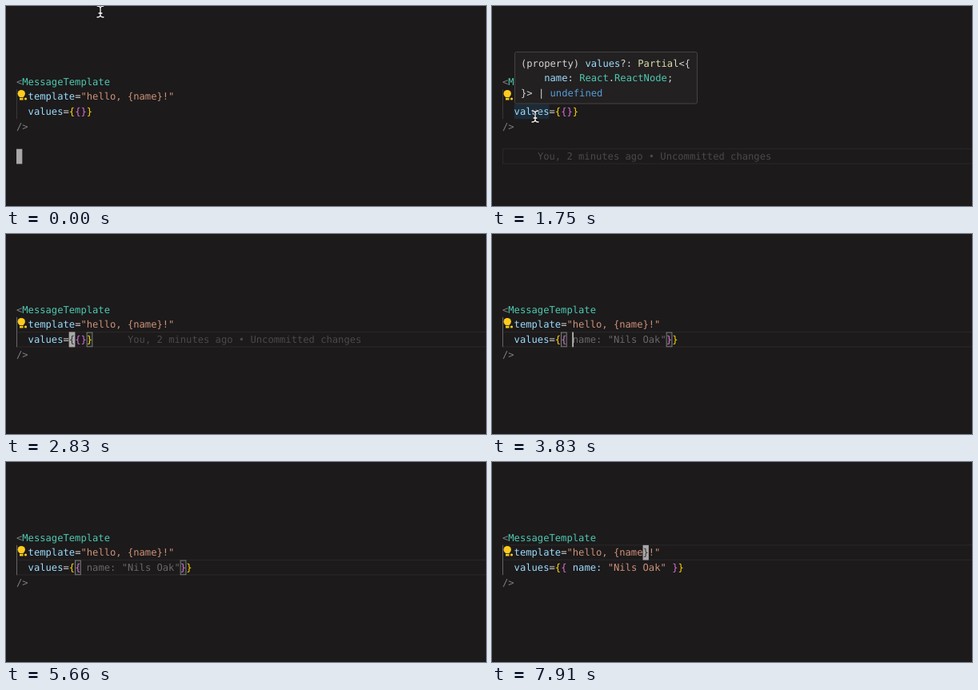
Animation, 600 px wide and 250 px high, one loop 8000 ms. Source, as an HTML page:

```html
<!DOCTYPE html>
<html lang="en">
<head>
<meta charset="utf-8">
<title>Editor demo</title>
<style>
  html, body { margin: 0; width: 100%; height: 100%; overflow: hidden; background: #1c1a1b; }
  svg { display: block; width: 600px; height: 250px; }
  text {
    font: 12.15px "DejaVu Sans Mono", monospace;
    white-space: pre;
    text-rendering: geometricPrecision;
  }
</style>
</head>
<body>
<svg viewBox="0 0 600 250">
  <rect width="600" height="250" fill="#1c1a1b"/>
  <g id="editor"></g>
  <g id="mouse" fill="none" stroke-linecap="round">
    <path d="M-4-7Q0-7 0-4Q0-7 4-7M0-4V4M-4 7Q0 7 0 4Q0 7 4 7M-2 2H2" stroke="#111" stroke-width="3"/>
    <path d="M-4-7Q0-7 0-4Q0-7 4-7M0-4V4M-4 7Q0 7 0 4Q0 7 4 7M-2 2H2" stroke="#fff" stroke-width="1.3"/>
  </g>
</svg>
<script>
const LOOP = 8000, CW = 7.315, LH = 18.7, LEFT = 13, TOP = 85.2;
const C = {
  bg: '#1c1a1b', tag: '#4ec9b0', attr: '#9cdcfe', str: '#ce9178', gold: '#ffd700',
  pink: '#da70d6', punct: '#808080', plain: '#d4d4d4', ghost: '#696768', blame: '#4b494a',
  fn: '#dcdcaa', key: '#569cd6', panel: '#222021', edge: '#454344', cursor: '#a9a7a8'
};
const NAME = '"Nils Oak"';
const BLAME = 'You, 2 minutes ago • Uncommitted changes';
const editor = document.getElementById('editor');
const mouse = document.getElementById('mouse');

// Each step changes part of the state; a new cursor place restarts the blink.
const steps = [
  [0, { row: 5, col: 0, mode: 'block', inner: 0, bright: false, line: false, blame: false, hover: false, menu: false, pair: null }],
  [1100, { blame: true, line: true }],
  [1750, { hover: true }],
  [2160, { hover: false, row: 4, blame: false, bright: false }],
  [2250, { row: 3 - 1, bright: true }],
  [2420, { blame: true }],
  [2480, { col: 2 }],
  [2600, { col: 8 }],
  [2700, { col: 9, pair: [9, 12] }],
  [2950, { col: 10, pair: [10, 11] }],
  [3130, { col: 11, mode: 'bar' }],
  [3690, { col: 12, inner: 1, pair: [10, 12] }],
  [3790, { inner: 2, blame: false, pair: [10, 28] }],
  [4600, { menu: true }],
  [5450, { menu: false }],
  [5680, { inner: 3, col: 28 }],
  [6080, { inner: 4, col: 29, pair: [10, 29] }],
  [6350, { mode: 'block', col: 28 }],
  [7000, { col: 27 }],
  [7080, { col: 26 }],
  [7160, { col: 25 }],
  [7240, { col: 24 }],
  [7660, { row: 1, pair: null }]
];

const mousePath = [
  [0, 118, 7], [250, 150, 26], [480, 200, 48], [830, 120, 73], [1250, 58, 135], [1500, 54, 138], [2160, 54, 138]
];

const menuItems = [
  ['name?', ''],
  ['epwc', 'Export Pdf Workflow Components'],
  ['fileheader', 'File Header Comments'],
  ['log', 'Print to console'],
  ['sf', 'Forwarded Ref Component'],
  ['trfc', 'Type React Functional Component']
];

const esc = s => s.replace(/&/g, '&amp;').replace(/</g, '&lt;');
const rect = (x, y, w, h, fill, extra = '') =>
  `<rect x="${x}" y="${y}" width="${w}" height="${h}" fill="${fill}" ${extra}/>`;
const text = (x, y, str, fill, extra = '') =>
  `<text x="${x}" y="${y}" fill="${fill}" ${extra}>${esc(str)}</text>`;
const colX = col => LEFT + col * CW;
const rowY = row => TOP + row * LH;
const baseY = row => rowY(row) + 13.5;

function runs(x, y, parts) {
  let out = '';
  for (const [str, fill, extra] of parts) {
    out += text(x, y, str, fill, extra);
    x += str.length * CW;
  }
  return out;
}

function innerParts(s) {
  const italic = 'font-style="italic"';
  if (s.inner === 0) return [];
  if (s.inner === 1) return [[' ', C.plain]];
  if (s.inner === 2) return [
    [' ', C.plain], ['name', C.ghost, italic],
    [': ' + NAME, C.ghost, s.menu ? '' : italic]
  ];
  return [[' name: ', C.attr], [NAME + (s.inner === 4 ? ' ' : ''), C.str]];
}

function codeLines(s) {
  return [
    [['<', C.punct], ['MessageTemplate', C.tag]],
    [['  template', C.attr], ['=', C.plain], ['"hello, {name}!"', C.str]],
    [['  values', C.attr], ['=', C.plain], ['{', C.gold], ['{', C.pink],
      ...innerParts(s), ['}', C.pink], ['}', C.gold]],
    [['/>', C.punct]],
    [], []
  ];
}

function bulb() {
  return `<g fill="#ffcc1d"><circle cx="19.2" cy="109.6" r="4.7"/>
    <path d="M17 113H21.5V117.5H17Z"/><circle cx="24.5" cy="116" r="1.6"/></g>
    <path d="M17 114.6H21.5" stroke="${C.bg}" stroke-width=".8"/>`;
}

function hoverCard() {
  return rect(28.5, 57.5, 228, 64.5, C.panel, `stroke="${C.edge}" rx="2"`) +
    runs(36, 75.5, [['(property) ', C.plain], ['values', C.attr], ['?: ', C.plain], ['Partial', C.fn], ['<{', C.plain]]) +
    runs(36, 94.2, [['    name', C.attr], [': ', C.plain], ['React', C.tag], ['.', C.plain], ['ReactNode', C.tag], [';', C.plain]]) +
    runs(36, 112.9, [['}> | ', C.plain], ['undefined', C.key]]);
}

function menu() {
  let out = rect(101.5, 141.5, 403, 120, C.panel, `stroke="${C.edge}"`) +
    rect(102, 142, 394, 18.7, '#04304f') +
    rect(496, 142, 8.5, 38, '#4b494a') +
    rect(505.5, 141.5, 110, 36.5, C.panel, `stroke="${C.edge}"`) +
    text(510, 159.3, '(property) name', '#b5b3b4');
  menuItems.forEach(([label, note], i) => {
    const y = 155.8 + i * LH;
    out += text(123, y, label, i ? '#d0ced0' : '#fff') +
      text(495, y - .4, note, '#a3a1a2', 'text-anchor="end" style="font-size:10.35px"');
    if (i) out += rect(106.5, y - 9.5, 10.5, 10.5, 'none', 'stroke="#c5c3c4" stroke-dasharray="1.6 .7"');
  });
  return out + `<path d="M105.5 150L112.5 146.5L117.5 149V154L110.5 157.5L105.5 155ZM105.5 150L110.5 152.5L117.5 149M110.5 152.5V157.5"
    fill="none" stroke="#c8e2f4" stroke-width="1.1" stroke-linejoin="round"/>`;
}

function caret(s, lines) {
  const x = colX(s.col), y = rowY(s.row);
  if (s.mode === 'bar') return rect(x - .5, y, 1.6, LH, '#c8c6c7');
  const char = lines[s.row].map(p => p[0]).join('')[s.col] || '';
  return rect(x, y, CW, LH, C.cursor) + text(x, baseY(s.row), char, '#353132');
}

function stateAt(t) {
  const s = {};
  let moved = 0;
  for (const [at, change] of steps) {
    if (at > t) break;
    Object.assign(s, change);
    if ('col' in change || 'row' in change) moved = at;
  }
  s.caretOn = (t - moved) % 1000 < 500;
  return s;
}

function draw(s) {
  const lines = codeLines(s);
  let out = '';
  if (s.line) out += rect(13.5, rowY(s.row), 600, LH - .3, 'none', 'stroke="#2a2829"');
  out += rect(13, rowY(1), 1, LH * 2, s.bright ? '#656364' : '#393738');
  if (s.hover) out += rect(colX(2), rowY(2), CW * 6, LH, '#1d2b37');
  for (const col of s.pair || [])
    out += rect(colX(col) + .3, rowY(2) + .5, CW - .5, LH - 1, '#202520', 'stroke="#858384" stroke-width=".9"');
  lines.forEach((parts, row) => { out += runs(LEFT, baseY(row), parts); });
  if (s.blame) {
    const length = lines[s.row].reduce((n, p) => n + p[0].length, 0);
    out += text(colX(length + 6), baseY(s.row), BLAME, C.blame);
  }
  out += bulb();
  if (s.caretOn) out += caret(s, lines);
  if (s.hover) out += hoverCard();
  if (s.menu) out += menu();
  return out;
}

function moveMouse(t) {
  const i = mousePath.findIndex(p => p[0] > t);
  mouse.style.display = i < 0 ? 'none' : '';
  if (i < 0) return;
  const [t0, x0, y0] = mousePath[i - 1], [t1, x1, y1] = mousePath[i];
  const u = (t - t0) / (t1 - t0);
  mouse.setAttribute('transform', `translate(${x0 + (x1 - x0) * u} ${y0 + (y1 - y0) * u})`);
}

let last = '';
function render(t) {
  const s = stateAt(t), key = JSON.stringify(s);
  if (key !== last) {
    editor.innerHTML = draw(s);
    last = key;
  }
  moveMouse(t);
}

let start;
function tick(now) {
  start ??= now;
  render(Math.max(0, now - start) % LOOP);
  requestAnimationFrame(tick);
}
render(0);
requestAnimationFrame(tick);
</script>
</body>
</html>
```
